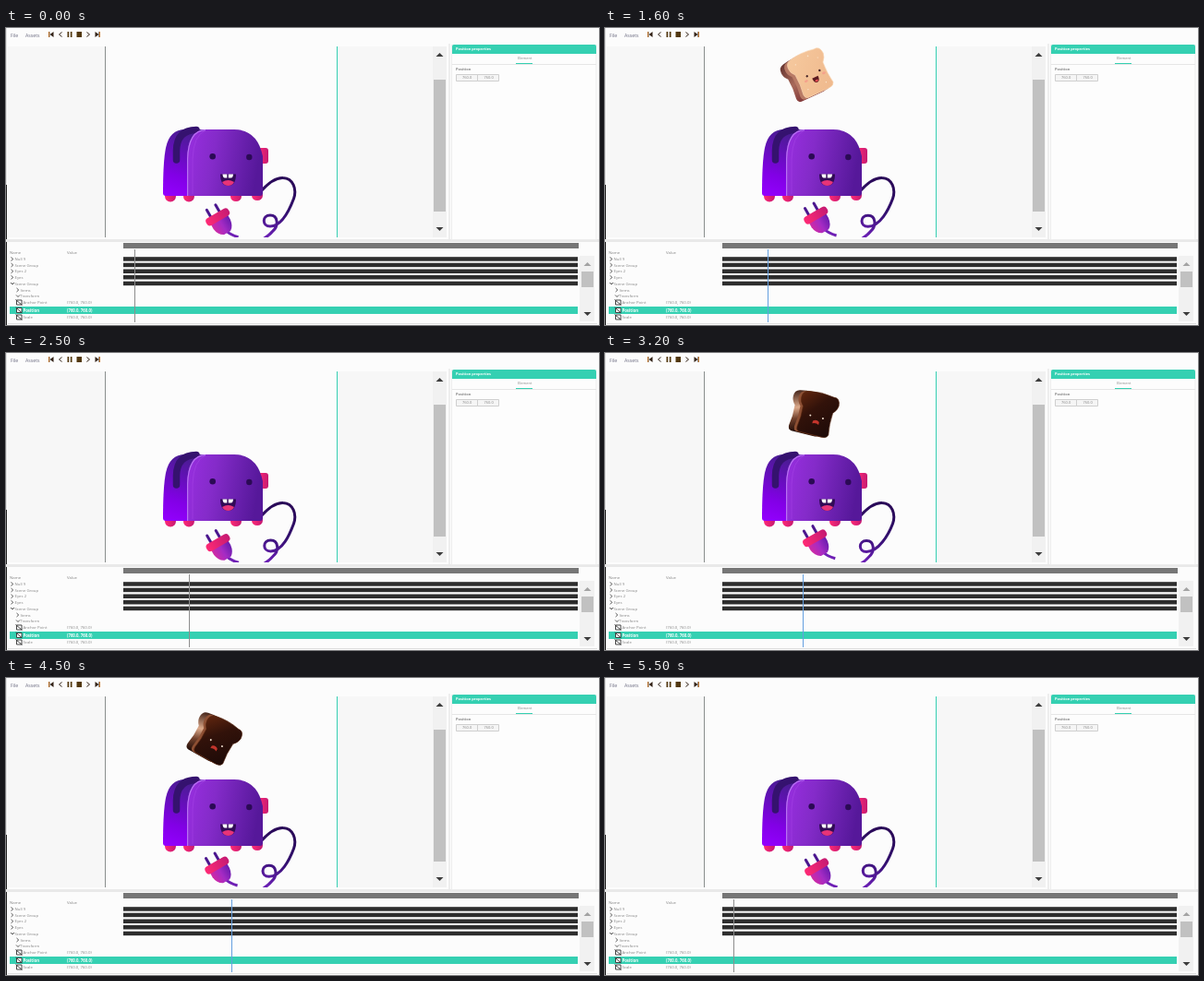
Animation of 642x322 px, one loop 5600 ms. Source, as an HTML page:

```html
<!DOCTYPE html>
<html lang="en">
<head>
<meta charset="utf-8">
<title>Toaster editor</title>
<style>
html, body { margin: 0; width: 100%; height: 100%; overflow: hidden; background: #fcfcfc; }
svg { display: block; width: 642px; height: 322px; }
text { font: 4.3px "Open Sans", "Noto Sans", sans-serif; fill: #858585; }
.menu { font-size: 5.2px; fill: #6b6b80; }
.bold { font-weight: 700; }
.inverse { fill: #fff; }
.chevron { fill: none; stroke: #444; stroke-width: .9; }
</style>
</head>
<body>
<svg viewBox="0 0 642 322" xmlns="http://www.w3.org/2000/svg">
  <defs>
    <clipPath id="view"><rect x="108" y="20" width="250" height="207"/></clipPath>
    <linearGradient id="back" x1="0" y1="1" x2=".25" y2="0">
      <stop offset="0" stop-color="#9400ff"/><stop offset=".35" stop-color="#8200e6"/><stop offset="1" stop-color="#4b1c94"/>
    </linearGradient>
    <linearGradient id="front" x1="0" x2="1" y2=".15">
      <stop offset="0" stop-color="#982ee0"/><stop offset=".4" stop-color="#842bc9"/><stop offset="1" stop-color="#56189a"/>
    </linearGradient>
    <linearGradient id="foot" x1="0" x2="1">
      <stop offset="0" stop-color="#ff2a75"/><stop offset="1" stop-color="#c51a72"/>
    </linearGradient>
    <linearGradient id="plugBody" x1="0" x2="1">
      <stop offset="0" stop-color="#d02aa4"/><stop offset=".5" stop-color="#a52bc4"/><stop offset="1" stop-color="#6a1cae"/>
    </linearGradient>
    <linearGradient id="cable" gradientUnits="userSpaceOnUse" x1="300" y1="165" x2="280" y2="225">
      <stop offset="0" stop-color="#2a0a58"/><stop offset=".5" stop-color="#32106e"/><stop offset="1" stop-color="#6a1fb4"/>
    </linearGradient>
    <linearGradient id="freshSide" x1="0" y1="0" x2=".4" y2="1">
      <stop offset="0" stop-color="#5f302d"/><stop offset=".55" stop-color="#a8695a"/><stop offset="1" stop-color="#7b3034"/>
    </linearGradient>
    <linearGradient id="freshFace" x1="0" x2="1" y2="1">
      <stop offset="0" stop-color="#f6c99e"/><stop offset="1" stop-color="#efb88c"/>
    </linearGradient>
    <linearGradient id="burntSide" x1="0" y1="0" x2=".3" y2="1">
      <stop offset="0" stop-color="#2a0d06"/><stop offset=".45" stop-color="#dca98a"/><stop offset=".7" stop-color="#70402c"/><stop offset="1" stop-color="#1d0a06"/>
    </linearGradient>
    <linearGradient id="burntFace" x1="0" x2="1" y2="1">
      <stop offset="0" stop-color="#65280f"/><stop offset=".4" stop-color="#32120a"/><stop offset="1" stop-color="#1b0907"/>
    </linearGradient>
    <path id="slice" d="M-10-22Q4-25 18-22Q25-23 25.500-14Q25-9 21-5Q20 8 22 19Q21 23 16 23L-9 23Q-13 23-13 18Q-11 7-12-5Q-16-9-16-14Q-16-21-10-22Z"/>
  </defs>

  <!-- editor frame -->
  <rect x="2" y="20" width="105" height="207" fill="#f7f7f7"/>
  <rect x="359" y="20" width="103" height="207" fill="#f7f7f7"/>
  <rect x="107" y="20" width="1" height="207" fill="#8b8f8e"/>
  <rect x="358" y="20" width="1" height="207" fill="#35d0b2"/>
  <rect width="1" height="170" fill="#e2e2e2"/>
  <rect y="170" width="1" height="152" fill="#222"/>
  <rect y="229" width="642" height="3" fill="#e9e9e9"/>
  <rect x="479" y="17" width="2" height="212" fill="#eee"/>
  <rect x="2" y="320" width="638" height="1" fill="#dedede"/>
  <text class="menu" x="5" y="10">File</text>
  <text class="menu" x="21" y="10">Assets</text>
  <g fill="#332318">
    <path d="M46 4h1.300v6H46ZM51.500 4v6L47.500 7ZM96.500 4v6L100.500 7ZM100.500 4h1.300v6h-1.300Z"/>
    <path d="M66.500 4h1.700v6h-1.700ZM69.800 4h1.700v6h-1.700ZM76.500 4h5.500v6h-5.500Z" fill="#52380f"/>
    <path d="M46 4h.7v6H46ZM101.300 4h.7v6h-.7Z" fill="#e88724"/>
    <path d="M60.500 4.500 57.500 7l3 2.500M87.500 4.500l3 2.500-3 2.500" fill="none" stroke="#332318"/>
  </g>
  <rect x="462" y="20" width="15" height="207" fill="#f1f1f1"/>
  <rect x="463" y="56" width="13" height="143" fill="#c1c1c1"/>
  <path d="M465.500 31h8l-4-4ZM465.500 216h8l-4 4Z" fill="#3c3c3c"/>

  <!-- properties -->
  <rect x="482.500" y="18.500" width="156.500" height="211" fill="#fdfdfd" stroke="#ededed"/>
  <path d="M483 28V20q0-2 2-2H637q2 0 2 2V28Z" fill="#35d0b2"/>
  <text class="bold inverse" x="487" y="24.300" style="font-size:4px">Position properties</text>
  <text x="554" y="34" style="font-size:4px">Element</text>
  <rect x="483" y="39" width="156" height="1" fill="#e6e6e6"/>
  <rect x="552" y="38" width="18" height="1" fill="#35d0b2"/>
  <text class="bold" x="487" y="46" style="font-size:4px">Position</text>
  <g fill="#f5f5f5" stroke="#cfcfcf"><path d="M487.500 50.500h23v7h-23ZM510.500 50.500h23v7h-23Z"/></g>
  <text x="494" y="55.300" style="font-size:4px">760.0</text>
  <text x="517.500" y="55.300" style="font-size:4px">760.0</text>

  <!-- scene -->
  <g clip-path="url(#view)">
    <g id="fresh">
      <use href="#slice" x="-9" y="1" fill="url(#freshSide)"/>
      <use href="#slice" x="-4" y=".5" fill="#b87a65"/>
      <use href="#slice" fill="url(#freshFace)" stroke="#f9d7b5" stroke-width=".6"/>
      <g fill="#fbe5cb"><circle cx="-7" cy="-15" r=".7"/><circle cx="9" cy="-18" r=".8"/><circle cx="18" cy="-12" r=".6"/><circle cx="15" cy="16" r=".7"/><circle cx="-6" cy="15" r=".7"/></g>
      <g fill="#422024"><circle cx="-1" cy="1.500" r="1.200"/><circle cx="14" cy="1.500" r="1.200"/></g>
      <g fill="#f5a18b"><ellipse cx="-4" cy="6" rx="2" ry="1.300"/><ellipse cx="17" cy="6" rx="2" ry="1.300"/></g>
      <path d="M3 6h7q0 6-3.500 6T3 6Z" fill="#5b1b20"/><path d="M4.500 10q2-2 4 0-2 3-4 0Z" fill="#ef4f55"/>
    </g>
    <g id="burnt">
      <use href="#slice" x="-9" y="1" fill="url(#burntSide)"/>
      <use href="#slice" x="-3" y=".5" fill="#8e5034"/>
      <use href="#slice" fill="url(#burntFace)" stroke="#54240f" stroke-width=".6"/>
      <g fill="#f0dfcf"><circle cx="-2" cy="3" r="1"/><circle cx="12" cy="3" r="1"/></g>
      <path d="M2 8q3.500-3 7 0v3q-3-2-7 0Z" fill="#c3352c"/>
    </g>

    <path id="cord" fill="none" stroke="url(#cable)" stroke-width="3"/>
    <rect x="273" y="130" width="11" height="17" rx="3" fill="url(#foot)"/>
    <g fill="url(#foot)">
      <ellipse cx="178" cy="182.500" rx="6" ry="6"/><ellipse cx="198" cy="182.500" rx="6" ry="6"/>
      <ellipse cx="249" cy="182.500" rx="6" ry="5.500"/><ellipse cx="272" cy="181.500" rx="6" ry="5.500"/>
    </g>
    <path d="M170 179Q170 145 173 130Q177 110 194 110H222V182H173Q170 182 170 179Z" fill="url(#back)"/>
    <path d="M184.500 143V133Q185 110.500 206 110.500" fill="none" stroke="#35126f" stroke-width="7.500" stroke-linecap="round"/>
    <rect x="180" y="104" width="40" height="6" fill="#fcfcfc" opacity="0"/>
    <path d="M196 182V142Q197 110 216 110H247Q272 110 278 139V179Q278 182 275 182Z" fill="url(#front)"/>
    <path d="M196.600 182V142Q197.500 111 216 110.600" fill="none" stroke="#b873f2" stroke-width="1.200"/>
    <path d="M202 180V142Q203 116 216 111" fill="none" stroke="#a846e8" stroke-width="1" opacity=".5"/>
    <g fill="#2b0a55"><circle cx="223.700" cy="139.300" r="3.300"/><circle cx="263.300" cy="140" r="3.200"/></g>
    <path d="M232 158.500h17q0 12.500-8.500 12.500T232 158.500Z" fill="#320b57"/>
    <path d="M234.500 158.500h4.800v4h-2.500q-2 0-2.300-4ZM240.800 158.500h5.200q-.3 4-2.300 4h-2.900Z" fill="#fff"/>
    <path d="M234 167q6.500-4 13 0-2 4-6.500 4T234 167Z" fill="#e83478"/>

    <g id="plug">
      <path d="M-1 16Q0 22 7 29" fill="none" stroke="#6f20b5" stroke-width="3"/>
      <path d="M-8-4V-13.500M3-4V-13.500" stroke="#4b168e" stroke-width="3" stroke-linecap="round"/>
      <path d="M-12 1H9V8Q8 16 3 19H-5Q-11 16-12 8Z" fill="url(#plugBody)"/>
      <rect x="-15.500" y="-5.500" width="28" height="9" rx="4" fill="url(#foot)"/>
    </g>
  </g>

  <!-- timeline -->
  <rect x="127" y="233" width="493" height="6" fill="#767676"/>
  <text x="4" y="244.700">Name</text>
  <text x="66" y="244.700">Value</text>
  <rect x="4" y="302" width="615" height="8" fill="#35d0b2"/>
  <g id="rows"></g>
  <rect x="621" y="247" width="16" height="71" fill="#f1f1f1"/>
  <rect x="623" y="264" width="13" height="17" fill="#c1c1c1"/>
  <path d="M625.500 258h8l-4-4Z" fill="#a3a3a3"/>
  <path d="M625.500 308h8l-4 4Z" fill="#3c3c3c"/>
  <rect id="playhead" y="240" width="1" height="79"/>
</svg>
<script>
const byId = id => document.getElementById(id);

// label, y, indent, kind
const rows = [
  ["Null 9", 250.500, 5, "closed"], ["Scene Group", 257, 5, "closed"],
  ["Eyes 2", 263.800, 5, "closed"], ["Eyes", 270.300, 5, "closed"],
  ["Scene Group", 277, 5, "open"], ["Items", 284, 11, "closed"],
  ["Transform", 290.500, 11, "open"], ["Anchor Point", 297.500, 11, "value"],
  ["Position", 306, 11, "selected"], ["Scale", 313.500, 11, "value"]
];

byId("rows").innerHTML = rows.map(([label, y, x, kind], i) => {
  const valued = kind === "value" || kind === "selected";
  const style = kind === "selected" ? "bold inverse" : "";
  const text = (tx, s) => `<text class="${style}" x="${tx}" y="${y + 1.500}">${s}</text>`;
  const bar = i < 5 ? `<rect x="127" y="${y - 2.300}" width="492" height="4.500" fill="#2d2d2d"/>` : "";
  const icon = valued
    ? `<path d="M11.500 ${y - 2.500}h5.500v5h-5.500ZM10.500 ${y - 3}l7 6" fill="#fff" stroke="#333" stroke-width=".9"/>`
    : `<path class="chevron" d="${kind === "open" ? `M${x} ${y - 1}l2 2 2-2` : `M${x + .5} ${y - 2}l2.200 2-2.200 2`}"/>`;
  return bar + icon + text(valued ? 18.500 : x + 4.500, label) + (valued ? text(66, "(760.0, 760.0)") : "");
}).join("");

const LOOP = 5600, STEP = 100, FLIGHT = 1800;
const height = [[0, 150], [100, 84], [200, 67.500], [500, 60.500], [700, 54], [900, 50.500],
  [1000, 47.500], [1200, 46], [1400, 51], [1600, 65.500], [1700, 107], [1800, 150]];
const tilt = [[0, 2], [100, 6], [200, 12], [900, 25], [1800, 31]];
const swing = [[0, 0], [900, 1], [1600, .25], [2500, -.1], [3700, 1], [3900, .85],
  [4500, .25], [5000, .05], [5600, 0]];

const smooth = u => u * u * (3 - 2 * u);
function sample(table, t, ease = u => u) {
  const i = Math.max(1, table.findIndex(([time]) => time >= t));
  const [t0, a] = table[i - 1], [t1, b] = table[i];
  return a + (b - a) * ease((t - t0) / (t1 - t0));
}

function toss(id, age, x, side) {
  const visible = age > 0 && age < FLIGHT;
  byId(id).style.display = visible ? "" : "none";
  if (visible) {
    byId(id).setAttribute("transform",
      `translate(${x} ${sample(height, age)}) rotate(${side * sample(tilt, age)})`);
  }
  return visible;
}

function cordPath(s) {
  const x = 286 - 5 * s, y = 209 + s;
  return `M276 177C285 167 293 162 300 162.500C311 163 315 175 311.500 185`
    + `C307 197 ${x + 13} ${y + 6} ${x} ${y + 6}C${x - 9} ${y + 6} ${x - 9} ${y - 6} ${x} ${y - 6}`
    + `C${x + 9} ${y - 6} ${x + 9} ${y + 6} ${x + 3} ${y + 11}Q${x - 1} ${y + 16} ${x - 8} ${y + 20}`;
}

function draw(t) {
  const fresh = toss("fresh", t - 700, 219, -1);
  const burnt = toss("burnt", t - 2900, 225, 1);
  const s = sample(swing, t, smooth);
  byId("plug").setAttribute("transform", `translate(${231 - 3.500 * s} ${205 - 7 * s}) rotate(${-30 + s})`);
  byId("cord").setAttribute("d", cordPath(s));
  const head = t < 5000 ? 139 + t * .0234 : 127 + (t - 5000) * .0234;
  byId("playhead").setAttribute("x", Math.round(head));
  byId("playhead").setAttribute("fill", fresh || burnt ? "#649fe0" : "#8d8d8d");
}

const start = performance.now();
function tick() {
  const t = (performance.now() - start) % LOOP;
  draw(Math.floor(t / STEP) * STEP);
  requestAnimationFrame(tick);
}
tick();
</script>
</body>
</html>
```
